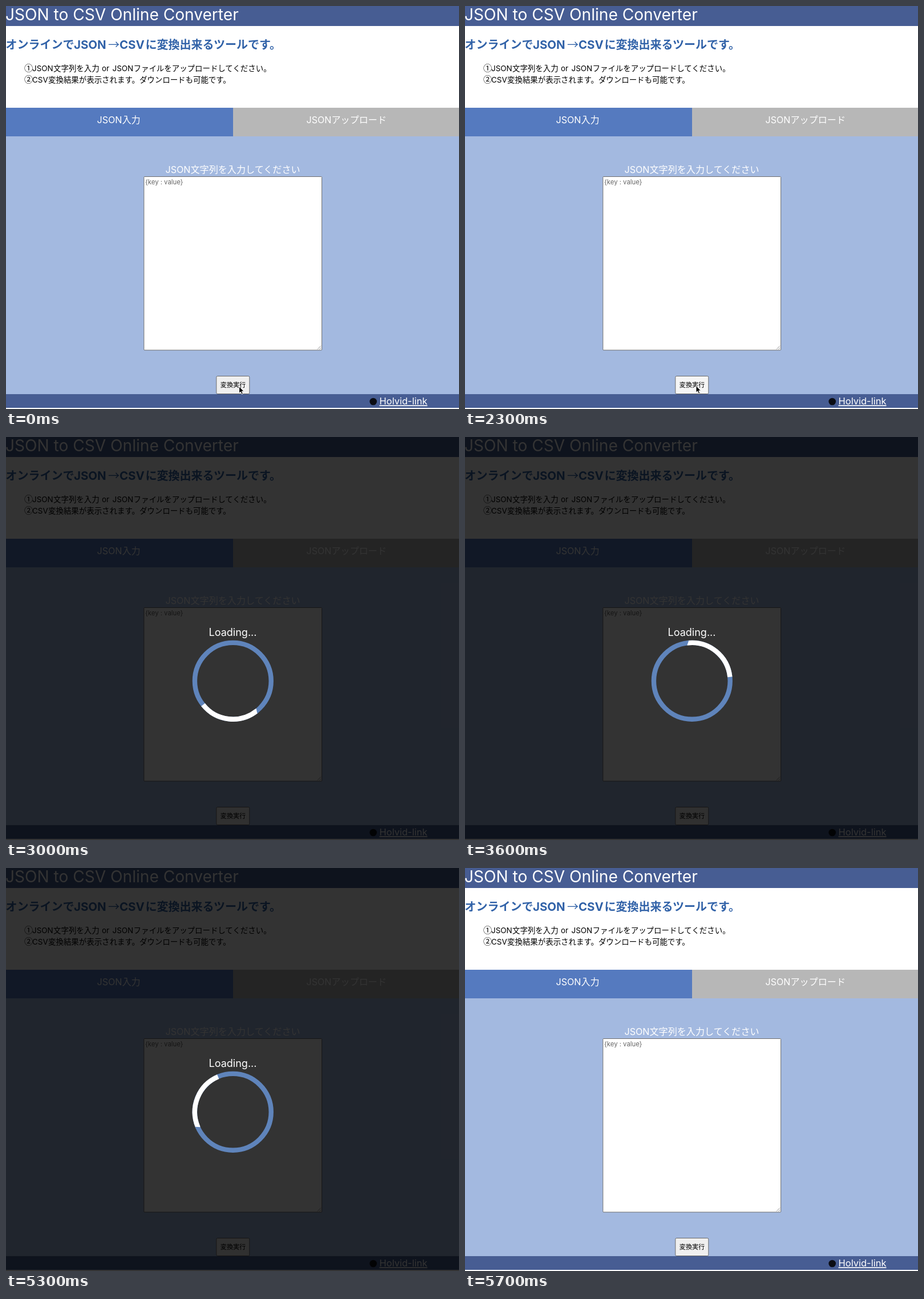
Animation of 794x705 px, one loop 5.8 s. Source, as an HTML page:

```html
<!DOCTYPE html>
<html lang="ja">
<head>
<meta charset="utf-8">
<title>JSON to CSV Online Converter</title>
<style>
  html, body { margin: 0; width: 100%; height: 100%; overflow: hidden; background: #fff; }
  svg { display: block; width: 794px; height: 705px; }
  text { font-family: Inter, "Noto Sans CJK JP", "Noto Sans CJK", sans-serif; white-space: pre; }
  .jp { font-family: "Noto Sans CJK JP", "Noto Sans CJK", sans-serif; }
  .head { font-size: 20px; font-weight: 700; fill: #3162a8; }
  .head .latin { font-size: 20.4px; }
  .head .arrow { font-weight: 400; }
  .list { font-size: 13.45px; fill: #000; }
  .list .num { font-size: 15.2px; }
  .label { font-size: 16.1px; fill: #fff; }
</style>
</head>
<body>
<svg viewBox="0 0 794 705">
  <rect width="794" height="705" fill="#fff"/>
  <rect width="794" height="35" fill="#475d93"/>
  <text x="-1" y="25" font-size="28.1" fill="#fff">JSON to CSV Online Converter</text>

  <text class="head" y="75"><tspan class="jp" x="-.5">オンラインで</tspan><tspan class="latin" x="119">JSON</tspan><tspan class="jp arrow" x="179">→</tspan><tspan class="latin" x="199">CSV</tspan><tspan class="jp" x="244.5">に変換出来るツールです。</tspan></text>

  <text class="list" y="114.3"><tspan class="jp num" x="32">①</tspan><tspan x="46">JSON</tspan><tspan class="jp" x="83">文字列を入力</tspan><tspan x="168">or</tspan><tspan x="186.5">JSON</tspan><tspan class="jp" x="223.5">ファイルをアップロードしてください。</tspan></text>
  <text class="list" y="134.3"><tspan class="jp num" x="32">②</tspan><tspan x="46">CSV</tspan><tspan class="jp" x="74">変換結果が表示されます。ダウンロードも可能です。</tspan></text>

  <rect y="178" width="398" height="50" fill="#557abf"/>
  <rect x="398" y="178" width="396" height="50" fill="#b7b7b7"/>
  <text class="label" x="159.5" y="204.5">JSON<tspan class="jp">入力</tspan></text>
  <text class="label" x="526.5" y="204.5">JSON<tspan class="jp">アップロード</tspan></text>

  <rect y="228" width="794" height="451" fill="#a3b9e0"/>
  <text class="label" x="279.5" y="292">JSON<tspan class="jp">文字列を入力してください</tspan></text>
  <rect x="241.8" y="298.5" width="311.8" height="303.5" rx="1" fill="#fff" stroke="#6f6f6f"/>
  <text x="244" y="312.3" font-size="11.3" fill="#666">{key : value}</text>
  <path d="M546 600.5l6-6M549.5 600.5l2.5-2.5" stroke="#777" stroke-width=".8"/>

  <rect id="button" x="368.8" y="647.5" width="58" height="31" rx="2" fill="#efefef" stroke="#6b6b6b"/>
  <text class="jp" x="375.8" y="667.3" font-size="11.1">変換実行</text>

  <rect y="679" width="794" height="24" fill="#475d93"/>
  <circle cx="643.7" cy="692" r="6.3" fill="#0b0d14"/>
  <text x="654.5" y="697.3" font-size="16.5" fill="#fff" text-decoration="underline">Holvid-link</text>

  <g id="overlay" visibility="hidden">
    <rect width="794" height="705" fill="#000" fill-opacity=".8"/>
    <text x="355.6" y="348" font-size="18" fill="#fff">Loading...</text>
    <g fill="none" stroke-width="8.4">
      <circle cx="397.8" cy="426.8" r="66.9" stroke="#5f84bb"/>
      <circle id="arc" cx="397.8" cy="426.8" r="66.9" stroke="#fff" pathLength="4" stroke-dasharray="1 3"/>
    </g>
  </g>

  <path id="cursor" d="M0 0V11.8L2.7 9.3 4.6 13.6 6.7 12.7 4.8 8.5H8.4Z" fill="#000" stroke="#fff" stroke-width=".9"/>
</svg>
<script>
  const LOOP = 5800, STEP = 100;
  const PRESS = 2300, LOAD = 2400, DONE = 5400, CURSOR_END = 2600;

  // [time, value] tables
  const spin = [[2400, -26], [3600, 399], [4500, 729.5], [5300, 1012]];
  const cursorX = [[0, 408.6], [2300, 405]];
  const cursorY = [[0, 665.6], [2300, 664.4]];

  const $ = id => document.getElementById(id);
  const button = $("button"), overlay = $("overlay"), arc = $("arc"), cursor = $("cursor");
  const show = (el, on) => el.setAttribute("visibility", on ? "visible" : "hidden");

  function at(table, t) {
    if (t <= table[0][0]) return table[0][1];
    for (let i = 1; i < table.length; i++) {
      const [t0, v0] = table[i - 1], [t1, v1] = table[i];
      if (t <= t1) return v0 + (v1 - v0) * (t - t0) / (t1 - t0);
    }
    return table[table.length - 1][1];
  }

  function draw(now) {
    const t = Math.floor(now % LOOP / STEP) * STEP;
    show(overlay, t >= LOAD && t < DONE);
    show(cursor, t < CURSOR_END);
    button.setAttribute("fill", t === PRESS ? "#f5f5f5" : "#efefef");
    cursor.setAttribute("transform", `translate(${at(cursorX, t)} ${at(cursorY, t)})`);
    arc.setAttribute("transform", `rotate(${at(spin, t) - 135} 397.8 426.8)`);
  }

  const start = performance.now();
  function tick() {
    draw(performance.now() - start);
    requestAnimationFrame(tick);
  }
  tick();
</script>
</body>
</html>
```
